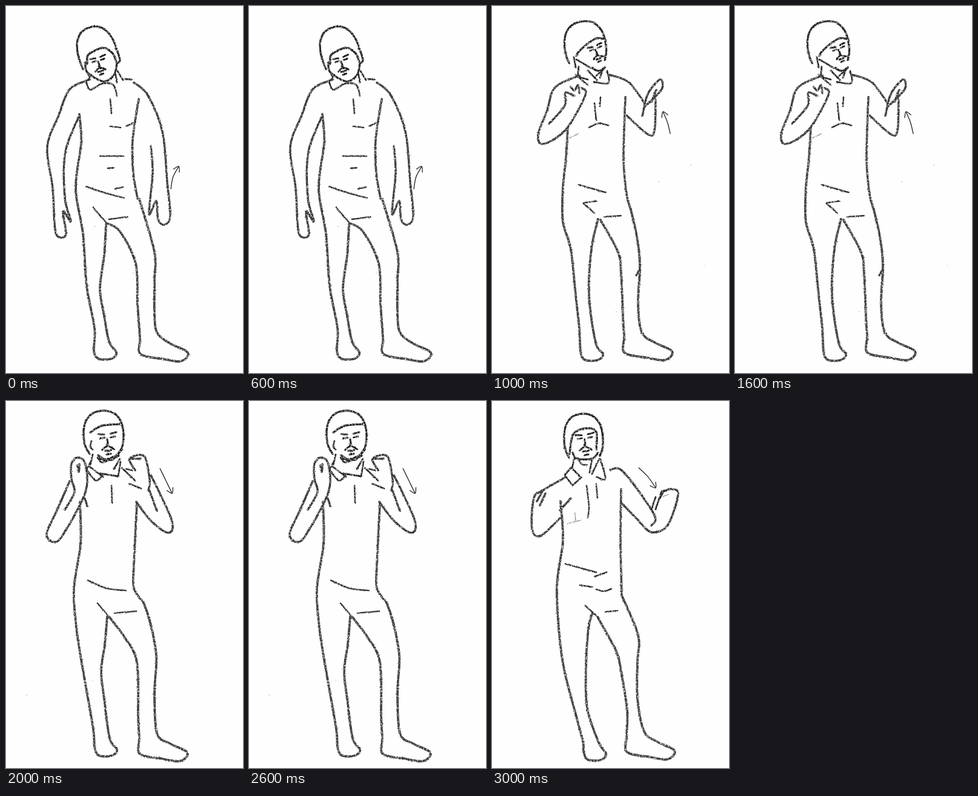
An HTML page that plays this animation: 391x604 px, repeating every 4 s.

```html
<!DOCTYPE html>
<html lang="en">
<head>
<meta charset="utf-8">
<title>Pencil figure</title>
<style>
html, body { margin: 0; width: 100%; height: 100%; overflow: hidden; background: #fefefe; }
svg { display: block; width: 100%; height: 100%; }
path { fill: none; stroke-linecap: round; stroke-linejoin: round; }
</style>
</head>
<body>
<svg id="stage" viewBox="0 0 391 604">
  <defs>
    <filter id="pencil" filterUnits="userSpaceOnUse" x="0" y="0" width="391" height="604" color-interpolation-filters="sRGB">
      <feTurbulence type="fractalNoise" baseFrequency="0.4" numOctaves="2" seed="7" result="noise"/>
      <feDisplacementMap in="SourceGraphic" in2="noise" scale="2.4" xChannelSelector="R" yChannelSelector="G" result="rough"/>
      <feColorMatrix in="noise" values="0 0 0 0 0  0 0 0 0 0  0 0 0 0 0  0 0 2.6 0 -0.35" result="grain"/>
      <feComposite in="rough" in2="grain" operator="in"/>
      <feGaussianBlur stdDeviation="0.45"/>
    </filter>
  </defs>
</svg>
<script>
const HOLD = 1000;
const stage = document.getElementById('stage');
const rad = deg => deg * Math.PI / 180;
const points = text => text.trim().split(/\s+/).map(p => p.split(',').map(Number));

// Scale, turn, then move local points
function place(pts, [x, y], tilt = 0, scale = 1) {
  const c = Math.cos(rad(tilt)) * scale, s = Math.sin(rad(tilt)) * scale;
  return pts.map(([u, v]) => [x + u * c - v * s, y + u * s + v * c]);
}

// Catmull-Rom spline as cubic Beziers
function spline(pts) {
  const at = i => pts[Math.max(0, Math.min(pts.length - 1, i))];
  let d = `M${pts[0]}h0`;
  for (let i = 0; i < pts.length - 1; i++) {
    const [a, b, c, e] = [at(i - 1), at(i), at(i + 1), at(i + 2)];
    const out = b.map((v, k) => v + (c[k] - a[k]) / 6);
    const into = c.map((v, k) => v - (e[k] - b[k]) / 6);
    d += `C${out} ${into} ${c}`;
  }
  return d;
}

// Several strokes, parted by "/"
const strokes = text => text.split('/').map(s => spline(points(s))).join('');

// Shapes shared by every pose
const leftFoot = points('-18,-16 -13,-3 0,0 14,-3 19,-12 7,-30');
const rightFoot = points('-1,-26 0,0 38,8 62,12 75,7 77,-4 50,-17 28,-34');
const features = ['-15,-15 -5,-14', '5,-15 15,-17', '-12,-8 -5,-9', '5,-9 12,-10', '-1,-7 0,2 -2,2', '-10,11 -3,6 2,6 10,11', '-5,13 5,12', '-3,19 4,18'].map(points);

function leg(down, foot, at, up) {
  return spline([...points(down), ...place(foot, at), ...points(up)]);
}

// Superellipse arc; angles run clockwise from the crown
function cap({ at, rx, ry, tilt, from, to }) {
  const bulge = v => Math.sign(v) * Math.abs(v) ** 0.86;
  const pts = [];
  for (let i = 0; i <= 16; i++) {
    const a = rad(from + (to - from) * i / 16);
    pts.push([rx * bulge(Math.sin(a)), -ry * bulge(Math.cos(a))]);
  }
  return spline(place(pts, at, tilt));
}

const face = ({ at, tilt, scale }) => features.map(f => spline(place(f, at, tilt, scale))).join('');

function arrow([from, to], bend) {
  const [dx, dy] = [to[0] - from[0], to[1] - from[1]];
  const mid = [from[0] + dx / 2 - dy * bend, from[1] + dy / 2 + dx * bend];
  const heading = Math.atan2(to[1] - mid[1], to[0] - mid[0]) * 180 / Math.PI;
  return spline([from, mid, to]) + spline(place(points('-8,-5.5 0,0 -8,5.5'), to, heading));
}

const poses = [
  {
    left: ['121,178 124,225 115,300 127,375 133,460 146,530', [163, 582], '162,510 155,465 162,410 165,360'],
    right: ['165,357 188,371 214,424 217,490', [222, 573], '245,510 245,450 245,405 220,318'],
    torso: '219,153 209,220 210,275 217,317',
    arms: '138,121 105,137 87,180 68,232 77,300 81,368 90,381 99,374 94,338 107,354 97,315 98,240 121,180' +
      '/ 211,126 234,147 258,207 266,290 271,345 262,360 251,352 248,321 236,342 242,275 239,231',
    cap: { at: [152, 80], rx: 32, ry: 47, tilt: -18, from: -105, to: 85 },
    head: '134,95 136,80 160,69 176,78 183,93 188,88 181,68 / 131,93 134,109 160,124 178,114 183,94',
    face: { at: [154, 97], tilt: -12, scale: 0.85 },
    collar: '133,108 138,118 132,124 / 132,124 139,138 158,128 177,130 183,148 / 184,107 193,122 / 181,113 183,126 / 196,120 207,121',
    folds: '172,153 174,177 / 172,198 189,200 / 198,198 213,191 / 155,247 194,247 / 168,267 178,266 / 132,297 165,308 195,316 / 180,301 193,298 / 144,332 165,356 / 170,351 200,347',
    arrow: [[272, 301], [285, 264]], bend: -0.08,
    specks: '146,363 / 210,440'
  },
  {
    left: ['125,200 122,250 117,300 117,355 130,400 138,475 144,530', [164, 584], '160,475 164,400 175,350'],
    right: ['179,352 208,405 213,440 216,510', [219, 571], '241,490 244,430 240,385 229,335'],
    torso: '220,150 217,250 222,310 229,335 / 238,443 244,434',
    arms: '145,114 104,134 91,172 76,212 85,227 122,203 154,147 148,135 / 94,194 120,164 121,143 136,148' +
      '/ 130,133 136,139 142,130 144,143 / 193,113 225,125 251,159 / 270,153 268,205 257,211 222,180' +
      '/ 248,181 257,145 277,121 280,137 253,165 / 263,158 271,138',
    cap: { at: [154, 67], rx: 34, ry: 42, tilt: -8, from: -120, to: 125 },
    head: '139,82 146,72 170,54 184,54 / 165,102 176,107 186,101',
    face: { at: [173, 77], tilt: -17, scale: 0.8 },
    collar: '135,84 138,101 / 139,88 163,102 / 143,100 143,115 158,121 / 138,113 158,130 / 158,106 173,122 / 186,102 171,116 / 183,104 178,118 / 190,107 192,127 168,125',
    folds: '169,160 172,188 / 179,150 178,165 / 160,200 177,193 193,197 / 143,294 188,307 / 151,324 173,321 / 151,325 169,341 / 185,347 213,345',
    arrow: [[294, 210], [282, 174]], bend: 0.04,
    specks: '128,217 143,210 / 275,289 / 328,262 / 350,427 / 205,503'
  },
  {
    left: ['122,166 123,235 112,310 117,380 130,460 144,540', [164, 585], '162,490 157,445 163,400 167,355'],
    right: ['170,355 195,388 216,430 218,520', [221, 581], '245,480 248,420 238,365 227,332'],
    torso: '216,168 211,270 211,308 227,332',
    arms: '105,132 84,180 67,218 78,232 94,220 131,150 131,105 119,93 108,103 108,128 113,150 97,179' +
      '/ 118,106 120,117 / 121,104 121,114 / 130,160 134,173 / 239,122 273,195 268,217 240,198 215,166' +
      '/ 237,148 249,181 / 213,114 204,95 228,91 237,130 235,147 / 204,95 222,95',
    cap: { at: [161, 56], rx: 33, ry: 40, tilt: -3, from: -135, to: 195 },
    head: '139,52 157,41 187,38 / 152,89 162,96 176,96 191,80 / 153,91 165,98 186,90',
    face: { at: [168, 69], tilt: -3, scale: 1 },
    collar: '141,66 139,75 143,80 / 143,88 139,105 / 188,95 178,112 / 141,98 133,113 / 133,113 148,131 160,122 / 138,108 160,125 / 155,119 185,124 / 189,100 185,124 / 151,93 158,101 169,98 / 191,110 213,131 / 198,112 208,114 / 203,136 223,144',
    folds: '174,139 175,168 / 135,295 165,308 198,312 / 151,333 168,353 / 179,349 215,346',
    arrow: [[254, 111], [274, 152]], bend: 0,
    specks: '143,459 / 34,484'
  },
  {
    left: ['113,165 117,230 107,310 116,425 138,515 150,560', [169, 592], '157,505 155,440 159,375 165,350'],
    right: ['175,357 205,412 213,445 223,510', [223, 578], '240,490 240,430 241,385 214,320'],
    torso: '213,145 212,230 214,320',
    arms: '122,125 84,147 69,160 66,210 80,222 112,193 / 84,147 74,165 / 88,152 79,172 / 130,160 112,180' +
      '/ 195,113 217,117 267,186 263,205 / 285,148 297,145 307,154 290,204 263,216 240,195 214,168',
    cap: { at: [151, 63], rx: 32, ry: 42, tilt: -3, from: -130, to: 130 },
    head: '128,87 134,55 155,45 172,51 172,80 / 133,85 140,95 165,95 175,85',
    face: { at: [154, 70], tilt: -4, scale: 1 },
    collar: '136,95 132,110 / 142,94 148,104 157,105 / 165,95 161,118 / 132,108 120,122 / 120,122 133,139 / 133,139 147,126 / 147,126 134,113 / 177,95 165,120 / 179,96 187,128 173,125 / 263,178 270,158 / 270,178 280,148 / 277,160 284,147',
    folds: '156,139 160,175 158,192 / 172,137 174,160 / 121,268 172,282 / 169,289 189,282 / 145,303 165,306 / 172,310 185,313 197,309 / 154,337 175,356 / 187,347 207,345',
    arrow: [[242, 110], [270, 143]], bend: -0.05,
    specks: '137,184 138,198 / 124,202 147,196 / 282,157 291,154'
  }
];

function make(tag, attrs, parent) {
  const el = document.createElementNS('http://www.w3.org/2000/svg', tag);
  for (const key in attrs) el.setAttribute(key, attrs[key]);
  return parent.appendChild(el);
}

function drawPose(pose) {
  const group = make('g', { display: 'none' }, stage);
  const rough = make('g', { filter: 'url(#pencil)' }, group);
  const ink = (d, width, stroke, parent = rough) => make('path', { d, stroke, 'stroke-width': width }, parent);
  const [downL, footL, upL] = pose.left;
  const [downR, footR, upR] = pose.right;
  ink(leg(downL, leftFoot, footL, upL), 3.8, '#3c3c3c');
  ink(leg(downR, rightFoot, footR, upR), 3.8, '#3c3c3c');
  ink(strokes(pose.torso), 3.6, '#3c3c3c');
  ink(strokes(pose.arms), 3.5, '#363636');
  ink(cap(pose.cap) + strokes(pose.head), 3.4, '#222');
  ink(face(pose.face), 3, '#161616');
  ink(strokes(pose.collar), 2.8, '#262626');
  ink(strokes(pose.folds), 2.6, '#2c2c2c');
  ink(strokes(pose.specks), 1.4, '#999');
  ink(arrow(pose.arrow, pose.bend), 1.3, '#222', group);
  return group;
}

const groups = poses.map(drawPose);
const start = performance.now();
let shown = -1;

function render(time) {
  const index = Math.floor(time / HOLD) % groups.length;
  if (index === shown) return;
  groups.forEach((g, i) => g.setAttribute('display', i === index ? 'inline' : 'none'));
  shown = index;
}

function tick() {
  render(performance.now() - start);
  requestAnimationFrame(tick);
}
tick();
</script>
</body>
</html>
```
